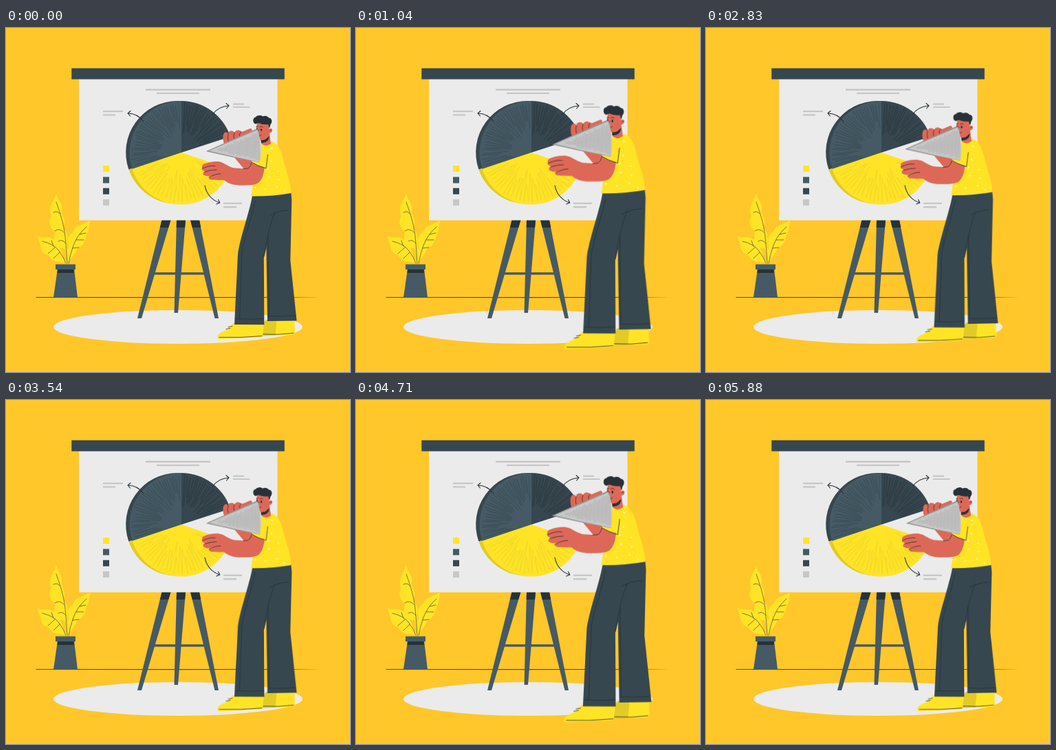
An HTML page for the animation above (5930 ms loop, 500 by 500 pixels).

```html
<!DOCTYPE html>
<html lang="en">
<head>
<meta charset="utf-8">
<title>Pie chart presentation</title>
<style>
html, body { margin: 0; width: 100%; height: 100%; overflow: hidden; background: #ffc72a; }
svg { display: block; width: 100%; height: 100%; }
#man { transform-origin: 353.5px 289.5px; }
.y { fill: #ffe426 } .o { fill: #e2cb27 } .g { fill: #c7c7c7 } .w { fill: #ebebeb }
.m { fill: #455a64 } .d { fill: #37474f } .k { fill: #263238 } .s { fill: #de6857 }
.ln { fill: none; stroke: #263238; stroke-width: .75; stroke-linecap: round; stroke-linejoin: round }
.ar { stroke-width: 1.1 }
.vein { stroke-width: .6 }
.hatch { fill: none; stroke-width: .6; stroke-linejoin: round }
</style>
</head>
<body>
<svg viewBox="0 0 500 500">
  <ellipse class="w" cx="250" cy="434.5" rx="181" ry="24.5"/>
  <path class="k" d="M43.5 391.2L250 391.3L400 391.2L455 391.7L400 392L250 392.3L43.5 391.9Z"/>

  <g id="plant">
    <path class="y" d="M89 341C87 332 88 322 84 320C77 321 69 314 70 304C70 301 72 298 70 295C63 290 62 281 65 275C66 271 63 269 64 263C66 253 70 250 73 240C75 251 81 253 81 261C81 266 80 268 83 274C87 282 84 287 84 291C90 298 90 306 89 314C89 322 91 332 91 341Z"/>
    <path class="y" d="M89 341C88 332 87 327 90 321C93 316 88 311 91 304C94 298 98 297 100 292C104 285 115 286 122 279C121 287 121 293 118 299C115 304 117 306 113 312C109 320 105 317 102 324C98 333 94 333 91 342Z"/>
    <path class="y" d="M88 342C80 339 70 341 65 335C62 331 61 330 56 328C50 324 51 317 49 313C48 309 46 307 46 302C53 307 60 302 67 306C74 309 72 314 77 318C82 324 82 328 83 332C85 338 88 338 89 342Z"/>
    <path class="ln vein" d="M73 253C78 267 84 284 86 303Q88 323 89 342M69 268Q75 265 78 270M71 295Q78 290 84 297M76 310Q81 306 87 313"/>
    <path class="ln vein" d="M117 289Q104 300 98 316Q93 330 91 342M116 298L107 300M113 308L102 308M106 319L97 320"/>
    <path class="ln vein" d="M53 310Q70 314 77 324Q84 333 87 342M61 328L71 319M69 335L78 326M66 309L69 317"/>
    <path class="m" d="M75 350H99L104 391.5H69Z"/>
    <path class="k" d="M75 350H99L98.5 356H74.5Z"/>
    <rect class="m" x="72" y="343.5" width="29" height="7.5"/>
  </g>

  <g id="easel">
    <rect class="m" x="214" y="355.2" width="74" height="3.4"/>
    <path class="m" d="M226.500 279H239.500L197 422H191ZM248 279H261L250 414H244.5ZM268 279H281L309 422H303.5Z"/>
    <path class="k" d="M226.500 279H239.500L236.2 290H223.8ZM248 279H261L260.1 290H247.7ZM268 279H281L283.2 290H270.7Z"/>
  </g>
  <rect class="w" x="106" y="70" width="288.500" height="209.5"/>
  <rect class="d" x="95.300" y="58.500" width="309.5" height="16"/>
  <path class="g" d="M203 88.6h94v2.3h-94zM219 93.8h62v2.3h-62zM141 120h29v2.3h-29zM141 125.2h18v2.3h-18zM330 109.6h16v2.1h-16zM330 114h24.5v2h-24.5zM316 253.7h27v2.4h-27zM316 259h19v2.4h-19z"/>
  <rect class="y" x="141" y="200" width="9" height="9"/>
  <rect class="m" x="141" y="216.5" width="9" height="9"/>
  <rect class="d" x="141" y="232.7" width="9" height="9"/>
  <rect class="g" x="141" y="249" width="9" height="9"/>

  <g id="pie">
    <path class="d" d="M255 106H250A75 75 0 0 0 178.3 205.5L184 205L255 181Z"/>
    <path class="o" d="M178.3 205.500A75 75 0 0 0 250 256H256L255 181Z"/>
    <path class="m" d="M255.500 181V106A75 75 0 0 0 183.5 205Z"/>
    <path class="d" d="M255 181V106A75 75 0 0 1 326 158Z"/>
    <path class="y" d="M255 181L183.5 205A75 75 0 0 0 326 205Z"/>
    <path class="hatch" id="hatchLeft" stroke="#3a4c56"/>
    <path class="hatch" id="hatchRight" stroke="#2a383f"/>
    <path class="hatch" id="hatchLow" stroke="#e9d128"/>
    <path class="ln ar" d="M200 136Q191 124 177 124M181 120.5L177 124L180.5 128"/>
    <path class="ln ar" d="M300 126Q308 114 324 113M320 109.5L324 113L320.5 117"/>
    <path class="ln ar" d="M289 229Q293 248 310.5 254M308.5 249.5L310.8 254L305.8 256"/>
  </g>

  <g id="man">
    <path class="y" d="M379 424H419.5L420 444Q419 446 413 446L374 447.5L372 432Z"/>
    <path class="o" d="M378 424H392C395 432 391 437 392 446.7L373 447.5V430Z"/>
    <path class="ln" d="M373 445Q396 446.500 418 443.5"/>
    <path class="y" d="M307.5 451C306 445 313 442 320 439C325 436 327 431 331 429H375L373 448Q372 450 365 450L312 452Q308 452.5 307.5 451Z"/>
    <path class="ln" d="M310 449.6Q341 450.6 372 447.6M320 437.5L326 436.5M323 434.5L329 433.5"/>

    <path class="d" d="M378 300L380 426L422.500 425.5L413.3 338L415 262Q416 250 414.3 239L372 243Z"/>
    <path class="d" d="M358 243.5C354 268 340 305 337 329L332 431L375.3 431.3L374.8 334C378 322 383 300 390 272L392 242Z"/>
    <path class="ln" d="M362 251C357 276 346 305 343 326L339.5 422M391 268C384 282 379 308 375 332M384 272Q397 265 410 265M381 300L382.5 417M333.5 422.6Q355 424 374.5 422.5M381 418.6Q400 419.5 421 418"/>

    <path class="s" d="M331 187L346 205H357L362 190Z"/>
    <path class="y" id="shirt" d="M371 167C379 169 386 165 387 165C397 169 401 181 404 195C408 211 414 224 414.500 240Q386 245 356 244.5C358 236 358 229 360 222L358 192L369 193Z"/>
    <path id="specks" fill="none" stroke="#fffbe0" stroke-linecap="round"/>
    <path class="s" d="M358 193L376 201C375 211 373 219 368 224C364 228.500 353 228.500 345 228.7C334 228.700 325 228 317 221Q309 221 298 220.5Q293 219 296 216.5L302 214.500Q293 217 287 213.5Q285 210.500 289 208Q283 206 285 203Q284 198 291 196.500C299 194 308 193 314 195.5C320 198 325 202.5 332 203.5L346 204.500Q355 204 358 193Z"/>
    <path class="y" d="M370 180L382 178L378 203Q367 201 357 195L358 190L369 193Z"/>
    <path class="ln" d="M380.5 184L378 204Q366 201 357 195M345 204.700L352 204Q356 201 357 196M286 204Q297 199 304 200.5M289 209Q299 206 306 206M295 217Q305 211.5 312 212"/>

    <path class="s" d="M369 153H383L385 168Q378 174 371 168Z"/>
    <path class="k" d="M370.500 161.500Q377 163 382.500 157C382.500 163 379 167 371 167Z"/>
    <path class="s" d="M365 138C364 144 363.5 148 362.3 151Q362 153.5 364.5 154C365 160 368 163 373 163C379 163 382 157 382.5 153Q387.3 152 387 148Q386 144.5 382 147L383 138Z"/>
    <path class="k" d="M363 139.500C358 139 358 130 363 129.500C365 126.5 371 126.5 373 128.5C377 126.5 381 128.5 382 130.5C387 131 387.500 137 384.5 140L383 146L381 140Q373 141 367 138Z"/>
    <ellipse class="k" cx="371" cy="148" rx="1.2" ry="1.8"/>
    <ellipse class="k" cx="364.8" cy="147" rx=".8" ry="1.5"/>
    <path class="ln" d="M369 143.7Q371.5 142 373.5 144M363.8 143.5L366 143M367.5 148L365.7 153L368 153.5M365 157Q369 158 371 155M383.5 149Q384.5 147.5 385.5 148.5"/>

    <path class="s" d="M316 165C314.5 157 316 152 319 151.5Q322 151 323 154Q323 150 327 149.5Q331 149 332 152Q334 148 338 148.5Q341 149 343 151L355 146Q358 146 357.5 150L350 164L317 169Z"/>
    <path class="ln" d="M323 154Q321.5 159 323 164M332 152Q330 156 331.5 161M342 150.5Q338 154 340 158"/>
    <path fill="#969696" d="M291.5 178.800L364 146.600L368 150L369 195.300Q330 189 291.5 179.600Z"/>
    <path class="g" d="M295 178.6L365 148.3C371 161 372 181 368.8 195Q332 187.700 295 178.6Z"/>
    <path class="hatch" id="hatchSlice" stroke="#b1b1b1"/>
  </g>
</svg>
<script>
const el = id => document.getElementById(id);
const draw = (id, points) => el(id).setAttribute('d', 'M' + points.map(p => p.map(v => v.toFixed(1)).join(' ')).join('L'));

function seeded(n) {
  return () => (n = (n * 16807) % 2147483647) / 2147483647;
}

// Zigzag strokes that fan out from the pie's middle between two angles in degrees.
function fan(id, from, to, count, near, seed) {
  const rnd = seeded(seed);
  const at = (angle, r) => {
    const a = angle * Math.PI / 180;
    return [255 + r * Math.cos(a), 181 + r * Math.sin(a)];
  };
  const points = [];
  for (let i = 0; i < count; i++) {
    const a = from + (to - from) * (i + .5) / count;
    points.push(at(a, near + rnd() * near), at(a + rnd() * 2 - 1, 73 - rnd() * 5));
  }
  draw(id, points);
}

fan('hatchLeft', 164, 268, 30, 24, 31);
fan('hatchRight', -88, -20, 20, 24, 57);
fan('hatchLow', 24, 158, 26, 24, 83);

// Upright zigzag between the two straight edges of the slice.
const jitter = seeded(19);
const strokes = [];
for (let x = 308; x < 368; x += 2.2) {
  const reach = x - 295;
  strokes.push([x, 181 - reach * .43 + jitter() * 3], [x + 1.5, 177 + reach * .22 - jitter() * 3]);
}
draw('hatchSlice', strokes);

// Short dashes scattered over the shirt.
const rnd = seeded(77);
let dashes = '';
for (let row = 0; row < 5; row++) {
  const y = 174 + row * 14;
  const left = row < 2 ? 385 : row < 4 ? 380 : 362;
  for (let x = left; x < 391 + row * 4; x += 14) {
    const a = rnd() * Math.PI;
    const spot = [x + rnd() * 5, y + rnd() * 6].map(v => v.toFixed(1)).join(' ');
    dashes += `M${spot}l${(2 * Math.cos(a)).toFixed(1)} ${(2 * Math.sin(a)).toFixed(1)}`;
  }
}
el('specks').setAttribute('d', dashes);

const LOOP = 5930;
const pulse = [[0, 1], [1160, 1.1], [3490, 1], [3540, 1], [4710, 1.1], [5880, 1], [LOOP, 1]];
el('man').animate(
  pulse.map(([t, s]) => ({ offset: t / LOOP, transform: `scale(${s})` })),
  { duration: LOOP, iterations: Infinity }
);
</script>
</body>
</html>
```
